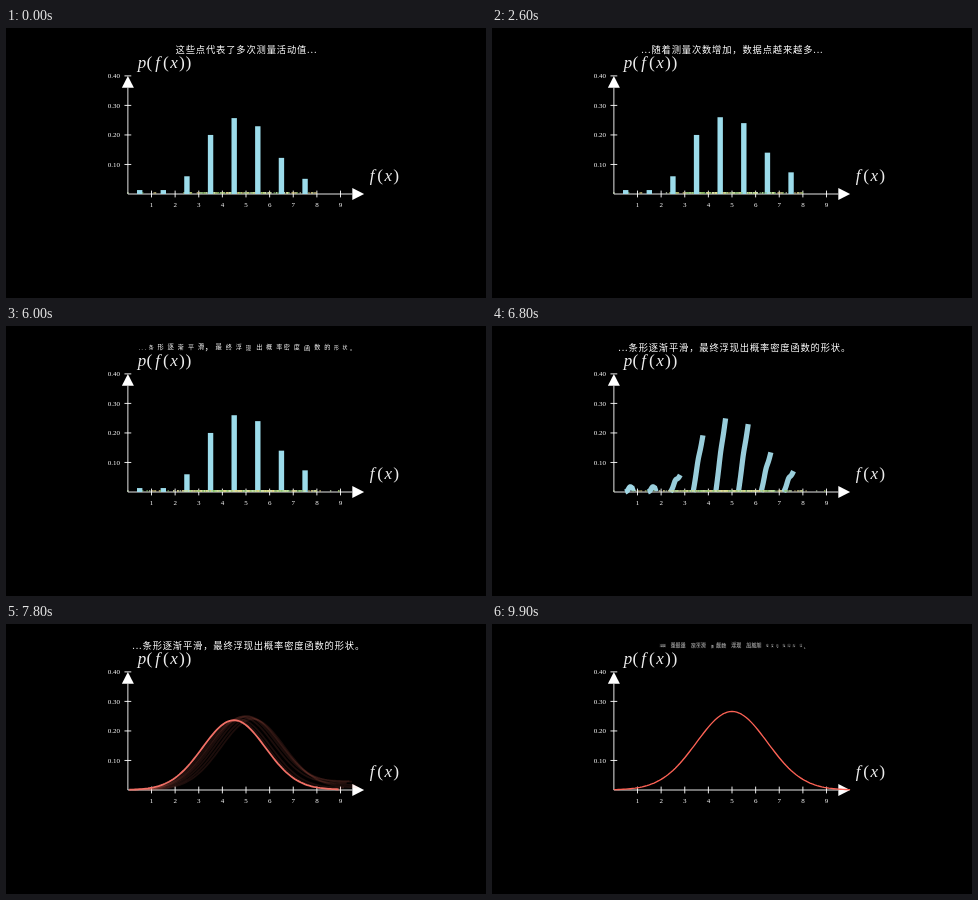
These frames come from a looping animation (480 px wide and 270 px high, 10 s). An HTML page with a canvas:

```html
<!DOCTYPE html>
<html lang="zh-CN">
<head>
<meta charset="utf-8">
<title>概率密度函数</title>
<style>
  html, body { margin: 0; width: 100%; height: 100%; overflow: hidden; background: #000; }
  canvas { display: block; width: 480px; height: 270px; }
</style>
</head>
<body>
<canvas id="stage" width="480" height="270"></canvas>
<script>
const ctx = document.getElementById('stage').getContext('2d');
const LOOP = 10000;
const X0 = 121.875, Y0 = 166, UNIT_X = 23.625, UNIT_Y = 295.3;
const MEAN = 5, SIGMA = 1.5;
const COUNTS = [2, 2, 9, 30, 39, 36, 21, 11];
const SAMPLES = 150, ALL_SAMPLES = 520;
const BLUE = [156, 220, 235], RED = [252, 98, 85];
const DOT_COLORS = ['#83c167', '#cfe5b9', '#e8d98a'];
const CAPTION_FONT = '9.3px "Noto Sans CJK SC", "Noto Sans CJK", sans-serif';
const CAPTION_SPACING = 0.82;
const SERIF = '"Liberation Serif", serif';
const DOTS_START = 2400, MORPH_START = 6400;

const clamp = v => Math.max(0, Math.min(1, v));
const lerp = (a, b, s) => a + (b - a) * s;
const sigmoid = v => 1 / (1 + Math.exp(-v));
const EDGE = sigmoid(-5);
const smooth = t => clamp((sigmoid(10 * (clamp(t) - 0.5)) - EDGE) / (1 - 2 * EDGE));
const progress = (time, start, duration) => smooth((time - start) / duration);
const px = x => X0 + x * UNIT_X;
const py = p => Y0 - p * UNIT_Y;
const density = x => Math.exp(-(((x - MEAN) / SIGMA) ** 2) / 2) / (SIGMA * Math.sqrt(2 * Math.PI));

let seed = 20;
function random() {
  seed = (seed * 16807) % 2147483647;
  return seed / 2147483647;
}
const gauss = () => Math.sqrt(-2 * Math.log(random())) * Math.cos(2 * Math.PI * random());

function makeDots() {
  const values = COUNTS.flatMap((n, bin) => Array.from({ length: n }, () => bin + random()));
  while (values.length < ALL_SAMPLES) {
    const v = MEAN + SIGMA * gauss();
    if (v > 0.4 && v < 9.1) values.push(v);
  }
  return values.map(v => ({ x: px(v), color: DOT_COLORS[Math.floor(random() * 3)] }));
}
const dots = makeDots();

function layout(text, x) {
  const baseline = 24.5;
  ctx.font = CAPTION_FONT;
  return [...text].map(ch => {
    const m = ctx.measureText(ch);
    const left = -m.actualBoundingBoxLeft, right = m.actualBoundingBoxRight;
    const up = m.actualBoundingBoxAscent, down = m.actualBoundingBoxDescent;
    const dx = (left + right) / 2, dy = (down - up) / 2;
    const glyph = { ch, dx, dy, cx: x + dx, cy: baseline + dy, size: Math.max(right - left, up + down) };
    x += m.width + CAPTION_SPACING;
    return glyph;
  });
}
const captions = [
  layout('这些点代表了多次测量活动值...', 169.6),
  layout('...随着测量次数增加，数据点越来越多...', 149.2),
  layout('...条形逐渐平滑，最终浮现出概率密度函数的形状。', 126.3),
  layout('测量次数增加...', 206)
];
const captionStarts = [1400, 5400, 9400];

function drawGlyph(glyph, cx, cy, size, alpha) {
  if (alpha <= 0) return;
  const scale = Math.min(1, size / glyph.size);
  ctx.save();
  ctx.globalAlpha = alpha;
  ctx.translate(cx, cy);
  ctx.scale(scale, scale);
  ctx.fillText(glyph.ch, -glyph.dx, -glyph.dy);
  ctx.restore();
}

function drawCaption(time) {
  ctx.font = CAPTION_FONT;
  ctx.fillStyle = '#fff';
  ctx.textAlign = 'left';
  const step = captionStarts.findLastIndex(start => time >= start);
  const s = step < 0 ? 0 : progress(time, captionStarts[step], 1000);
  if (s === 0 || s === 1) {
    const still = captions[s === 1 ? step + 1 : Math.max(0, step)];
    for (const g of still) drawGlyph(g, g.cx, g.cy, g.size, 1);
    return;
  }
  const from = captions[step], to = captions[step + 1];
  const n = Math.max(from.length, to.length);
  const shrink = 1 - 0.45 * Math.sin(Math.PI * s);
  const mix = clamp((s - 0.3) / 0.4);
  for (let k = 0; k < n; k++) {
    const a = from[Math.floor(k * from.length / n)];
    const b = to[Math.floor(k * to.length / n)];
    const cx = lerp(a.cx, b.cx, s), cy = lerp(a.cy, b.cy, s);
    const size = lerp(a.size, b.size, s) * shrink;
    drawGlyph(a, cx, cy, size, 1 - mix);
    drawGlyph(b, cx, cy, size, mix);
  }
}

function line(x1, y1, x2, y2) {
  ctx.beginPath();
  ctx.moveTo(x1, y1);
  ctx.lineTo(x2, y2);
  ctx.stroke();
}

function triangle(...points) {
  ctx.beginPath();
  points.forEach(([x, y]) => ctx.lineTo(x, y));
  ctx.fill();
}

function drawFormula(text, x, baseline) {
  const em = 16.7;
  const advance = { p: 0.503, f: 0.598, x: 0.572, '(': 0.389, ')': 0.389 };
  ctx.textAlign = 'center';
  for (const ch of text) {
    const width = advance[ch] * em;
    ctx.font = /[a-z]/.test(ch) ? `italic 17px ${SERIF}` : `17.5px ${SERIF}`;
    ctx.fillText(ch, x + width / 2, baseline);
    x += width;
  }
}

function drawAxes() {
  const endX = px(10), endY = py(0.4), tip = 11.8;
  ctx.strokeStyle = ctx.fillStyle = '#fff';
  ctx.lineWidth = 0.9;
  line(X0, Y0, endX - tip, Y0);
  line(X0, Y0, X0, endY + tip);
  triangle([endX, Y0], [endX - tip, Y0 - 6], [endX - tip, Y0 + 6]);
  triangle([X0, endY], [X0 - 6, endY + tip], [X0 + 6, endY + tip]);
  ctx.font = `7px ${SERIF}`;
  ctx.textAlign = 'center';
  for (let i = 1; i <= 9; i++) {
    line(px(i), Y0 - 3.4, px(i), Y0 + 3.4);
    ctx.fillText(i, px(i), 179.3);
  }
  ctx.textAlign = 'right';
  for (let i = 1; i <= 4; i++) {
    const y = py(i / 10);
    line(X0 - 3.4, y, X0 + 3.4, y);
    ctx.fillText((i / 10).toFixed(2), 114, y + 2.3);
  }
  ctx.fillStyle = '#ececec';
  drawFormula('p(f(x))', 131.8, 39.6);
  drawFormula('f(x)', 361, 152.8);
}

function drawDots(time, first, last) {
  ctx.globalAlpha = 0.75 * (1 - progress(time, MORPH_START, 1000));
  for (const dot of dots.slice(first, last)) {
    ctx.fillStyle = dot.color;
    ctx.beginPath();
    ctx.arc(dot.x, 164.9, 0.8, 0, 2 * Math.PI);
    ctx.fill();
  }
  ctx.globalAlpha = 1;
}

// Each bar is a thick upright stroke that bends into the bell curve.
function drawBars(time) {
  const s = progress(time, MORPH_START, 2000);
  const color = BLUE.map((c, i) => Math.round(lerp(c, RED[i], s)));
  ctx.strokeStyle = `rgb(${color})`;
  ctx.lineWidth = lerp(5.4, 1.35, s);
  ctx.lineJoin = 'round';
  for (let i = COUNTS.length - 1; i >= 0; i--) {
    const grown = smooth(0.583 + 0.105 * (7 - i) + time / 1000);
    const height = COUNTS[i] / SAMPLES * grown;
    ctx.globalAlpha = i === 0 ? 1 : 1 - s;
    if (ctx.globalAlpha === 0) continue;
    const segments = s > 0 ? 100 : 1;
    ctx.beginPath();
    for (let k = 0; k <= segments; k++) {
      const u = k / segments;
      ctx.lineTo(px(lerp(i + 0.5, 10 * u, s)), py(lerp(height * u, density(10 * u), s)));
    }
    ctx.stroke();
  }
  ctx.globalAlpha = 1;
}

function draw(time) {
  ctx.fillStyle = '#000';
  ctx.fillRect(0, 0, 480, 270);
  drawAxes();
  const shown = Math.round(lerp(SAMPLES, ALL_SAMPLES, clamp((time - DOTS_START) / 2000)));
  drawDots(time, 0, SAMPLES);
  drawBars(time);
  drawDots(time, SAMPLES, shown);
  drawCaption(time);
}

const begin = performance.now();
function frame() {
  draw((performance.now() - begin) % LOOP);
  requestAnimationFrame(frame);
}
frame();
</script>
</body>
</html>
```
